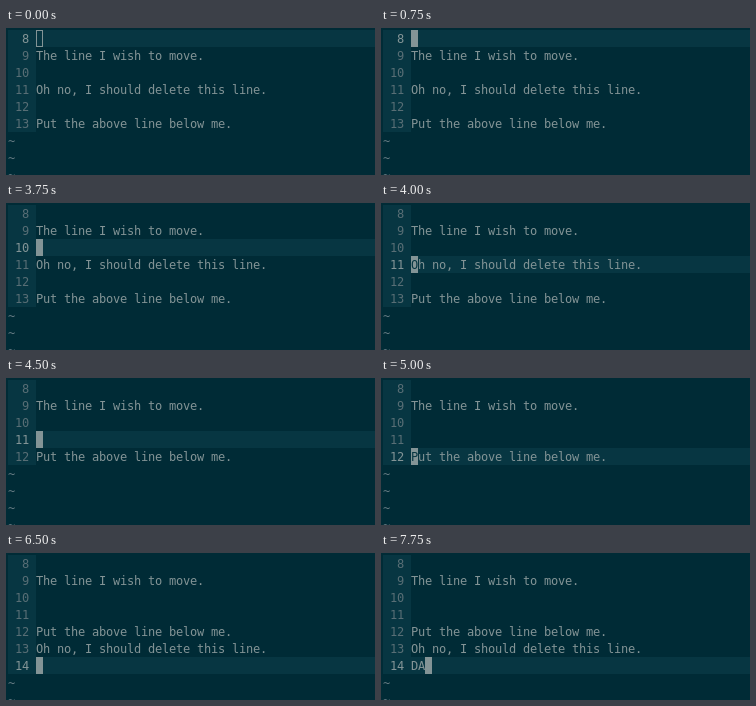
Animation of 369x147 px, one loop 8000 ms. Source, as an HTML page with a canvas:

```html
<!DOCTYPE html>
<html lang="en">
<head>
<meta charset="utf-8">
<title>Moving a line in an editor</title>
<style>
html, body { margin: 0; width: 100%; height: 100%; overflow: hidden; background: #002b36; }
canvas { display: block; }
</style>
</head>
<body>
<canvas id="stage" width="369" height="147"></canvas>
<script>
const ctx = document.getElementById('stage').getContext('2d');
const LOOP = 8000, W = 369, H = 147;
const CELL = 7, ROW = 17, LEFT = 2, TOP = 2, GUTTER = 4, FIRST_LINE = 8;
const BG = '#002b36', BAR = '#073642', TEXT = '#839496', DIM = '#586e75', TILDE = '#657b83';

const MOVE = 'The line I wish to move.';
const OH = 'Oh no, I should delete this line.';
const PUT = 'Put the above line below me.';
const before = ['', MOVE, '', OH, '', PUT];
const cut = ['', MOVE, '', '', PUT];
const pasted = [...cut, OH];

// start time, buffer, cursor row, cursor column
const steps = [
  [0, before, 0, 0],
  [1750, before, 1, 0],
  [3750, before, 2, 0],
  [4000, before, 3, 0],
  [4500, cut, 3, 0],
  [5000, cut, 4, 0],
  [5500, pasted, 5, 0],
  [6500, [...pasted, ''], 6, 0],
  [7500, [...pasted, 'D'], 6, 1],
  [7750, [...pasted, 'DA'], 6, 2]
];

const cellX = col => LEFT + col * CELL;
const rowY = row => TOP + row * ROW;

function fill(col, row, width, color) {
  ctx.fillStyle = color;
  ctx.fillRect(cellX(col), rowY(row), width, ROW);
}

function write(text, col, row, color) {
  ctx.fillStyle = color;
  [...text].forEach((ch, i) => ctx.fillText(ch, cellX(col + i), rowY(row) + 13));
}

function draw(t) {
  const [, lines, row, col] = steps.findLast(step => step[0] <= t);
  ctx.fillStyle = BG;
  ctx.fillRect(0, 0, W, H);
  ctx.font = '12px "DejaVu Sans Mono", monospace';

  for (let r = 0; rowY(r) < H; r++) {
    if (r >= lines.length) {
      write('~', 0, r, TILDE);
      continue;
    }
    const current = r === row;
    const number = String(FIRST_LINE + r);
    fill(0, r, current ? W : GUTTER * CELL, BAR);
    write(number, GUTTER - 1 - number.length, r, current ? TEXT : DIM);
    write(lines[r], GUTTER, r, TEXT);
  }

  // The cursor is hollow until the window gains focus.
  if (t < 750) {
    ctx.strokeStyle = TEXT;
    ctx.strokeRect(cellX(GUTTER + col) + 0.5, rowY(row) + 0.5, CELL - 1, ROW - 1);
  } else {
    fill(GUTTER + col, row, CELL, TEXT);
    write(lines[row][col] || '', GUTTER + col, row, BAR);
  }
}

function tick() {
  draw(performance.now() % LOOP);
  requestAnimationFrame(tick);
}
tick();
</script>
</body>
</html>
```
